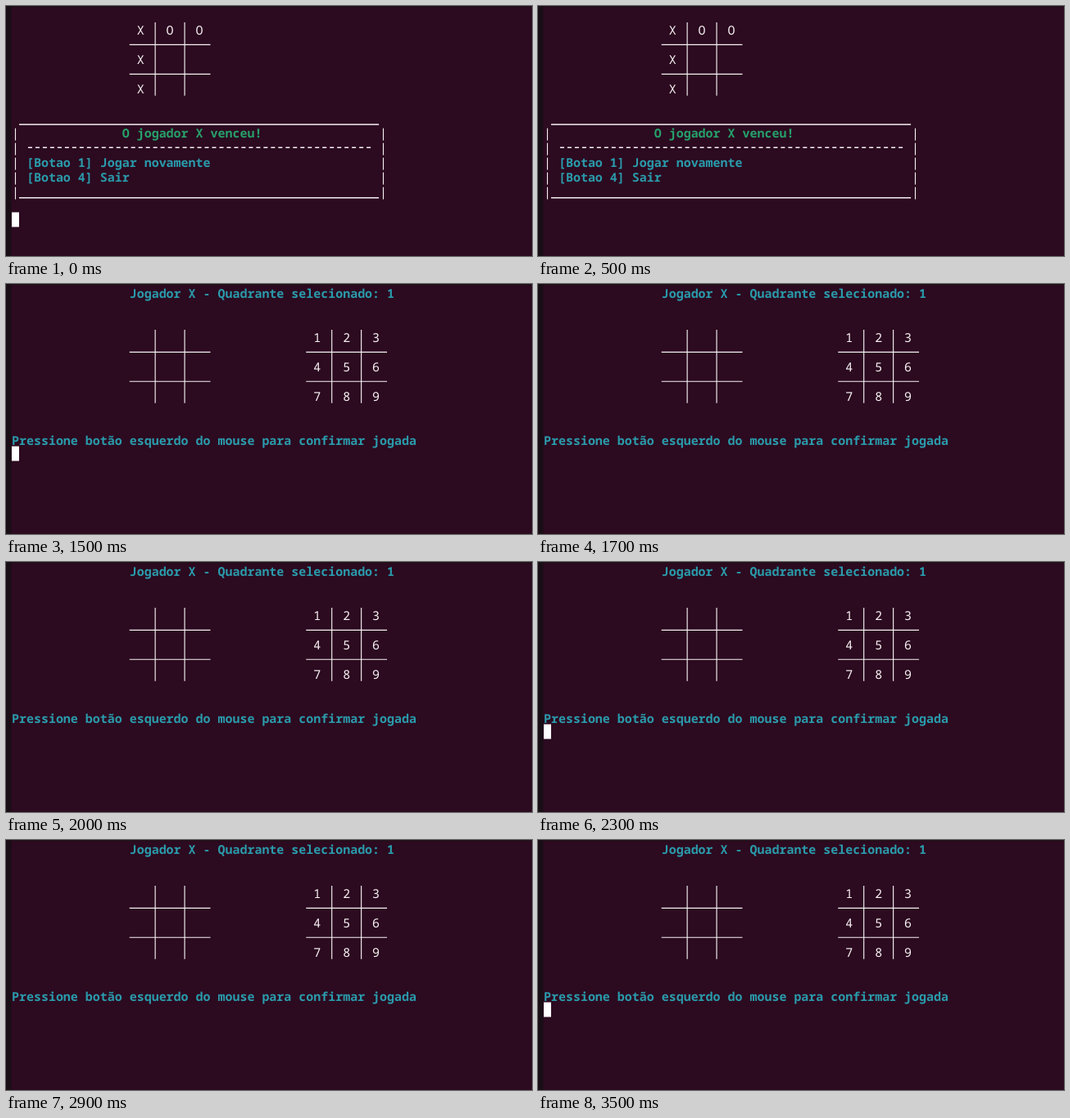
Animation of 642x306 px, one loop 4100 ms. Source, as an HTML page:

```html
<!DOCTYPE html>
<html lang="pt">
<head>
<meta charset="utf-8">
<title>Jogo da velha</title>
<style>
  html, body { margin: 0; width: 100%; height: 100%; overflow: hidden; background: #2c0a20; }
  svg { display: block; width: 642px; height: 306px; }
  text { font: 15px "Noto Sans Mono", "DejaVu Sans Mono", monospace; fill: #f8f3f4; white-space: pre; text-rendering: geometricPrecision; }
  .teal, .green { font-weight: 700; }
  .teal { fill: #2a9bab; }
  .green { fill: #26a06a; }
  .line { fill: none; stroke: #f6f2f4; stroke-width: 1.15; }
  .rule { stroke-width: 1.5; }
  .cursor { fill: #fff; animation: blink 4.1s step-end infinite; }
  .result { animation: result 4.1s step-end infinite; }
  .turn { animation: turn 4.1s step-end infinite; }
  @keyframes result {
    0% { visibility: visible; }
    36.58%, 100% { visibility: hidden; }
  }
  @keyframes turn {
    0% { visibility: hidden; }
    36.58%, 100% { visibility: visible; }
  }
  @keyframes blink {
    0%, 26.82%, 56.09%, 85.36%, 100% { opacity: 1; }
    12.19%, 41.46%, 70.73% { opacity: 0; }
  }
</style>
</head>
<body>
<svg viewBox="0 0 642 306">
  <defs>
    <path id="grid" class="line" d="M0 27.5H99M0 63.5H99M31.5 0V90M67.5 0V90"/>
    <text id="sides" x="7">|                                                 |</text>
  </defs>
  <rect width="642" height="306" fill="#2c0a20"/>
  <rect width="642" height="1.5" fill="#21101a"/>
  <rect width="6.5" height="306" fill="#190e15"/>

  <!-- The terminal's 9 by 18 cells appear slightly reduced -->
  <g transform="scale(.998)">
    <g class="result">
      <use href="#grid" x="151" y="20"/>
      <text x="160" y="35">X   O   O</text>
      <text x="160" y="71">X</text>
      <text x="160" y="107">X</text>

      <path class="line rule" d="M16 145.2H456M16 235.2H456"/>
      <path class="line rule" stroke-dasharray="5 4" d="M27 173.7H446"/>
      <use href="#sides" y="161"/>
      <use href="#sides" y="179"/>
      <use href="#sides" y="197"/>
      <use href="#sides" y="215"/>
      <use href="#sides" y="233"/>

      <text class="green" x="142" y="161">O jogador X venceu!</text>
      <text class="teal" x="25" y="197">[Botao 1] Jogar novamente</text>
      <text class="teal" x="25" y="215">[Botao 4] Sair</text>
      <rect class="cursor" x="7" y="253" width="9" height="18"/>
    </g>

    <g class="turn">
      <text class="teal" x="151" y="17">Jogador X - Quadrante selecionado: 1</text>
      <use href="#grid" x="151" y="56"/>
      <use href="#grid" x="367" y="56"/>
      <text x="376" y="71">1   2   3</text>
      <text x="376" y="107">4   5   6</text>
      <text x="376" y="143">7   8   9</text>
      <text class="teal" x="7" y="197">Pressione botão esquerdo do mouse para confirmar jogada</text>
      <rect class="cursor" x="7" y="199" width="9" height="18"/>
    </g>
  </g>
</svg>
</body>
</html>
```
